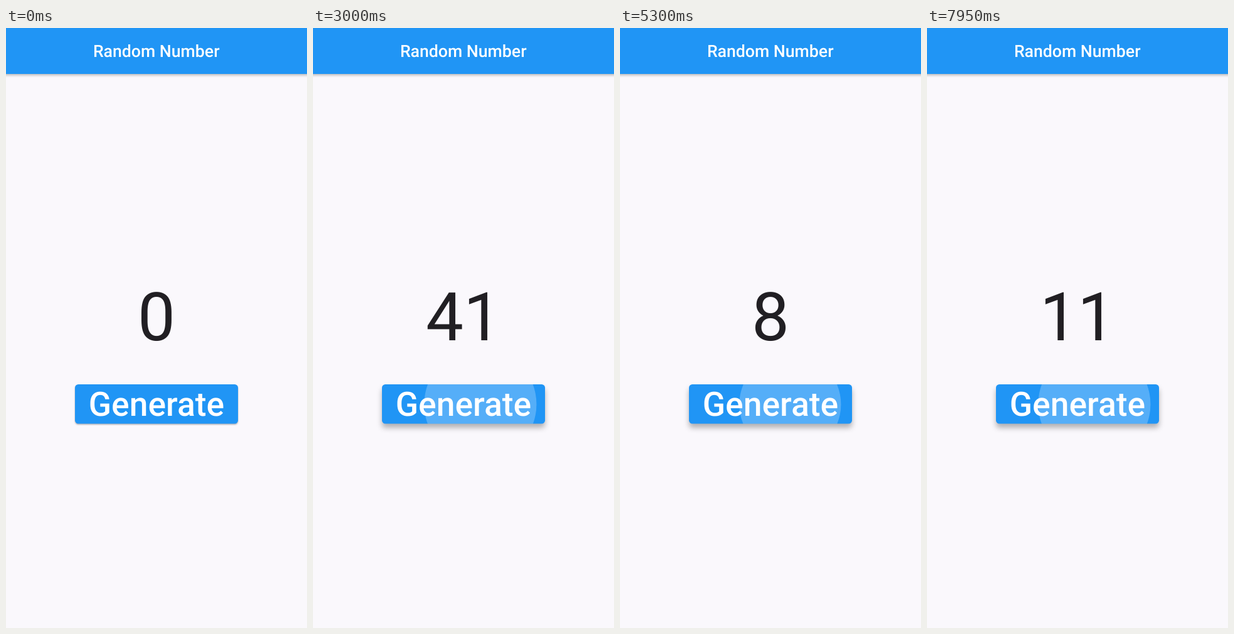
These frames come from a looping animation (480 px wide and 953 px high, 8000 ms). An HTML page:

```html
<!DOCTYPE html>
<html lang="en">
<head>
<meta charset="utf-8">
<title>Random Number</title>
<style>
  html, body { margin: 0; width: 100%; height: 100%; overflow: hidden; background: #faf8fc; }
  svg { display: block; width: 100%; height: 100%; }
  text { font-family: Roboto, sans-serif; text-anchor: middle; text-rendering: geometricPrecision; }
  .label { fill: #fff; font-weight: 500; }
</style>
</head>
<body>
<svg viewBox="0 0 480 953" xmlns="http://www.w3.org/2000/svg">
  <defs>
    <filter id="barBlur" filterUnits="userSpaceOnUse" x="-30" y="-30" width="540" height="150">
      <feGaussianBlur stdDeviation="1.9"/>
    </filter>
    <filter id="btnBlur" filterUnits="userSpaceOnUse" x="70" y="530" width="340" height="150">
      <feGaussianBlur id="blur" stdDeviation="1"/>
    </filter>
    <clipPath id="btnClip"><rect x="110" y="566" width="260" height="62.5" rx="5.33"/></clipPath>
  </defs>
  <rect width="480" height="953" fill="#faf8fc"/>
  <rect x="-20" y="-20" width="520" height="95" opacity=".27" filter="url(#barBlur)"/>
  <rect width="480" height="73" fill="#2095f5"/>
  <text class="label" x="239.7" y="45.8" font-size="26.67">Random Number</text>
  <text id="number" x="240" y="496.2" font-size="106.67" fill="#211f23">0</text>
  <g filter="url(#btnBlur)">
    <rect id="shadow" x="110" y="566" width="260" height="62.5" rx="5.33" opacity=".29"/>
  </g>
  <rect x="110" y="566" width="260" height="62.5" rx="5.33" fill="#2095f5"/>
  <g id="ripples" clip-path="url(#btnClip)" fill="#fff"></g>
  <text class="label" x="240" y="615.6" font-size="53.33">Generate</text>
</svg>
<script>
const LOOP = 8000, STEP = 50;
const CENTER = { x: 240, y: 597.25 }, TOUCH = { x: 293, y: 598 };
const REACH = Math.hypot(260, 62.5) / 2;
const R_START = REACH * 0.3, R_END = REACH + 6.67;

// Each tap: press time, release time, number shown on release.
const taps = [
  [475, 1084, 19], [1470, 1870, 27], [2080, 2500, 41], [2710, 3180, 22],
  [3410, 3980, 35], [4230, 4800, 8], [5050, 5620, 14], [5910, 6430, 32],
  [6825, 7290, 11], [7660, 8300, 0]
].map(([down, up, value]) => ({ down, up, value }));

const $ = id => document.getElementById(id);
const clamp = v => Math.min(1, Math.max(0, v));
const mix = (a, b, k) => a + (b - a) * k;

function bezier(x1, y1, x2, y2) {
  const at = (a, b, s) => 3 * (1 - s) * (1 - s) * s * a + 3 * (1 - s) * s * s * b + s * s * s;
  return x => {
    if (x <= 0 || x >= 1) return clamp(x);
    let lo = 0, hi = 1;
    for (let i = 0; i < 24; i++) {
      const mid = (lo + hi) / 2;
      if (at(x1, x2, mid) < x) lo = mid; else hi = mid;
    }
    return at(y1, y2, lo);
  };
}
const ease = bezier(0.25, 0.1, 0.25, 1);
const fastOutSlowIn = bezier(0.4, 0, 0.2, 1);

for (const tap of taps) {
  tap.circle = document.createElementNS("http://www.w3.org/2000/svg", "circle");
  $("ripples").append(tap.circle);
}

// Slow growth while held, quick finish and fade after release.
function drawRipple({ down, up, circle }, t) {
  const held = Math.min(t, up) - down;
  const k = ease(clamp(held / 1000 + Math.max(0, t - up) / 225));
  const alpha = 0.24 * clamp((t - down) / 75) * (1 - clamp((t - up - 225) / 150));
  circle.setAttribute("cx", mix(TOUCH.x, CENTER.x, k));
  circle.setAttribute("cy", mix(TOUCH.y, CENTER.y, k));
  circle.setAttribute("r", mix(R_START, R_END, k));
  circle.setAttribute("opacity", alpha);
}

function draw(t) {
  let value = 0, lift = 0;
  for (const tap of taps) {
    drawRipple(tap, t);
    if (t >= tap.up) value = tap.value;
    lift += fastOutSlowIn((t - tap.down) / 200) - fastOutSlowIn((t - tap.up) / 200);
  }
  const elevation = mix(2, 8, lift);
  $("number").textContent = value;
  $("shadow").setAttribute("y", 566 + elevation * 0.8);
  $("blur").setAttribute("stdDeviation", elevation * 0.55);
}

const start = performance.now();
function tick() {
  const t = (performance.now() - start) % LOOP;
  draw(Math.floor(t / STEP) * STEP);
  requestAnimationFrame(tick);
}
tick();
</script>
</body>
</html>
```
